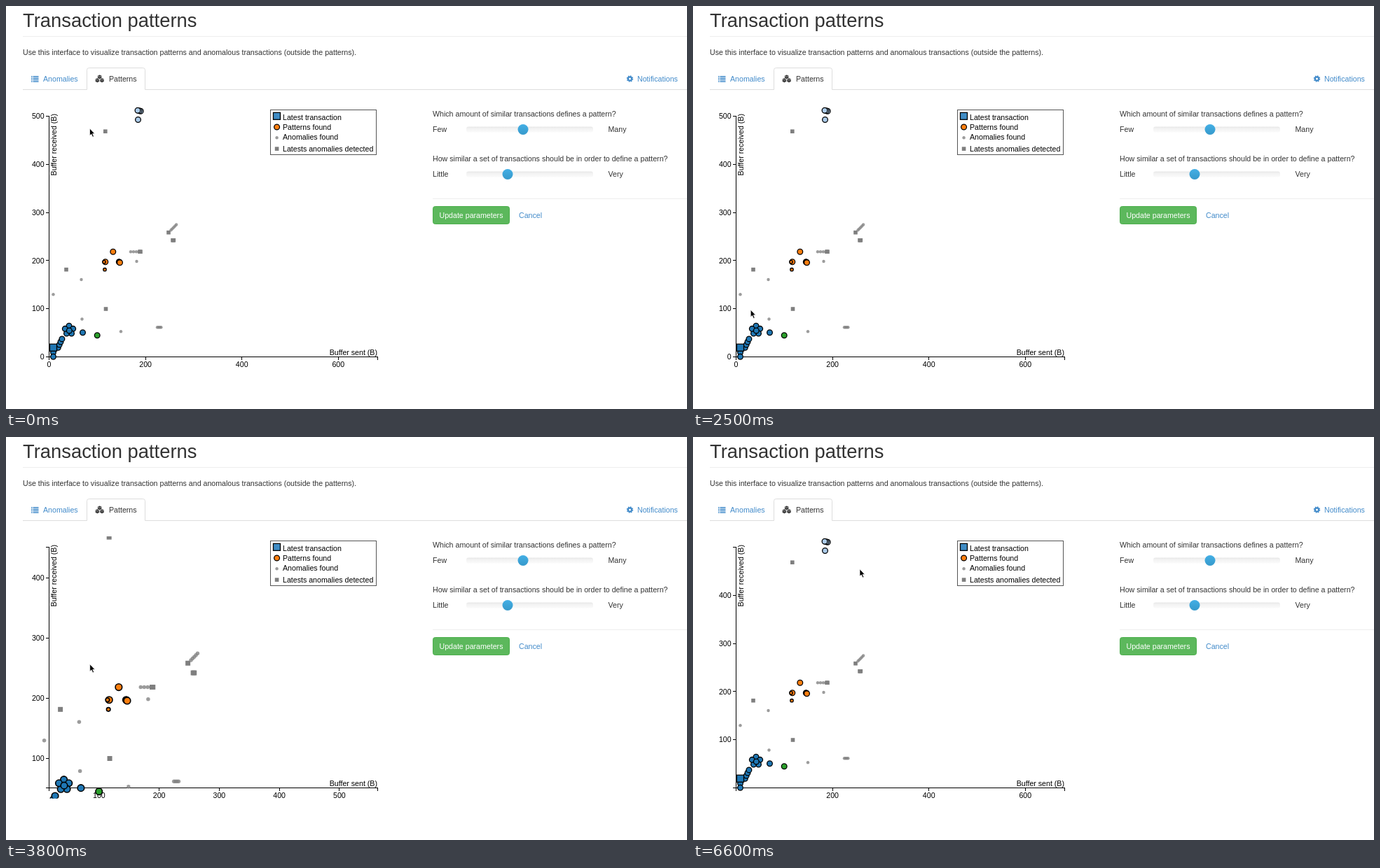
Write an HTML page that moves like this. It is 972 by 576 pixels and loops after 6.7 s.

```html
<!DOCTYPE html>
<html lang="en">
<head>
<meta charset="utf-8">
<title>Transaction patterns</title>
<style>
  html, body { margin: 0; width: 100%; height: 100%; overflow: hidden; background: #fff; }
  svg { position: absolute; left: 0; top: 0; }
  text { font: 10.64px "Liberation Sans", Arial, sans-serif; fill: #333; white-space: pre; }
  .chart text { fill: #000; }
  .title { font-size: 27.36px; }
  .link { fill: #428bca; }
  .mid { text-anchor: middle; }
  .end { text-anchor: end; }
  .line { fill: none; stroke: #000; shape-rendering: crispEdges; }
  .dot { stroke: #000; stroke-width: 1.3; }
  .anomaly { fill: #808080; fill-opacity: .78; }
  .recent { fill: #7f7f7f; }
  #tip {
    position: absolute; left: 67px; top: 469px; box-sizing: border-box; width: 141px;
    padding: 3.5px 5px 4px; background: #1f77b4; color: #fff; border-radius: 1px;
    font: 8.4px/11.25px "Liberation Sans", Arial, sans-serif; white-space: nowrap;
  }
  #tip.open { width: 199px; }
  #tip .more { display: none; }
  #tip.open .more { display: block; }
</style>
</head>
<body>
<svg width="972" height="576" viewBox="0 0 972 576">
  <defs>
    <clipPath id="plot"><rect x="46.5" y="142" width="499" height="374.5"/></clipPath>
    <linearGradient id="track" x2="0" y2="1">
      <stop offset="0" stop-color="#e6e6e6"/><stop offset=".35" stop-color="#f3f3f3"/><stop offset="1" stop-color="#fafafa"/>
    </linearGradient>
    <linearGradient id="knob" x2="0" y2="1">
      <stop offset="0" stop-color="#43afe5"/><stop offset="1" stop-color="#3699cb"/>
    </linearGradient>
    <path id="cube" d="M0-3.3 3-2V1.6L0 3.1-3 1.6V-2Z"/>
  </defs>

  <text class="title" x="24" y="29.5">Transaction patterns</text>
  <path d="M24 43.5H972M609 275.5H972" stroke="#eee"/>
  <text x="24" y="70">Use this interface to visualize transaction patterns and anomalous transactions (outside the patterns).</text>

  <path d="M24 119.5H115.5V91.5q0-3 3-3H195.5q3 0 3 3V119.5H972" fill="none" stroke="#ddd"/>
  <path d="M36 100.8H46.5M36 103.2H46.5M36 105.6H46.5M36 108H46.5" stroke="#428bca" stroke-width="1.5" stroke-dasharray="1.6 .9 8"/>
  <text class="link" x="53" y="108">Anomalies</text>
  <g fill="#333" stroke="#fff" stroke-width=".5">
    <use href="#cube" x="133.7" y="101.5"/><use href="#cube" x="130.4" y="106.3"/><use href="#cube" x="137" y="106.3"/>
    <path d="M127.5 104.8l2.9 1.3 3-1.3M134.1 104.8l2.9 1.3 3-1.3M130.8 100l2.9 1.3 3-1.3" fill="none"/>
  </g>
  <text x="147" y="108">Patterns</text>
  <g fill="none" stroke="#428bca">
    <circle cx="890.5" cy="104" r="2.6" stroke-width="2.2"/>
    <circle cx="890.5" cy="104" r="4" stroke-width="1.5" stroke-dasharray="1.6 1.54"/>
  </g>
  <text class="link" x="901" y="108">Notifications</text>

  <g id="sliders"></g>
  <rect x="609.5" y="286.5" width="109" height="25" rx="3" fill="#5cb85c" stroke="#4cae4c"/>
  <text class="mid" x="664" y="303" style="fill:#fff">Update parameters</text>
  <text class="link" x="732" y="303">Cancel</text>

  <g class="chart">
    <path class="line" d="M57 157.5H61.5V501.5H57M61.5 506V501.5H530.5V506"/>
    <g id="ticks"></g>
    <text class="end" x="530" y="498.5">Buffer sent (B)</text>
    <text class="end" transform="translate(72.3 154) rotate(-90)">Buffer received (B)</text>
    <g clip-path="url(#plot)">
      <g id="nodes">
        <g id="anomalies"></g>
        <g id="recent"></g>
        <g id="patterns"></g>
        <rect class="dot" x="62.5" y="483.2" width="10" height="10" fill="#1f77b4"/>
      </g>
    </g>
    <rect x="377.5" y="148.5" width="151" height="64" fill="#fff" stroke="#555"/>
    <rect class="dot" x="381.5" y="152.3" width="10" height="10" fill="#3f8cc5"/>
    <circle class="dot" cx="386.6" cy="173" r="3.9" fill="#ff7f0e"/>
    <circle class="anomaly" cx="386.6" cy="188.2" r="2.2"/>
    <rect class="recent" x="383.8" y="201.3" width="5.6" height="5.6"/>
    <text x="395" y="162.5">Latest transaction</text>
    <text x="395" y="177">Patterns found</text>
    <text x="395" y="191.2">Anomalies found</text>
    <text x="395" y="207.6">Latests anomalies detected</text>
  </g>
</svg>

<div id="tip">
  <b>URL:</b> http://http-echo.cloudwalk.io<br>
  <b>Sent</b> 9 bytes<br>
  <b>Received</b> 19 bytes<br>
  <b>Pattern seen</b> 413966 times<br>
  <b>Last seen at</b> 2014-10-13 11:30:47
  <div class="more"><b>First seen at</b> 2014-09-12 08:14:05<br>
  <b>Average time</b> between transactions 6 seconds</div>
</div>

<svg width="972" height="576" viewBox="0 0 972 576">
  <g id="cursor">
    <path id="arrow" d="M0 0V10.2L2.3 8.2 4.2 12.2 5.9 11.4 4.1 7.6H7.2Z" stroke="#fff" stroke-width=".7"/>
    <path id="hand" d="M.6.9Q1.6 0 2.6 1L5.2 3.8 7.2 3.6 9 4.8 10.2 7 10.4 9.2 7.8 11.6 5.2 10.6 2.2 9.2 2 8.2 4 8.2 3.4 5.6.8 2.4Q.1 1.6.6.9ZM5.2 3.8 6.3 5.2M7.2 3.6 8 4.9" fill="#fff" stroke="#444" stroke-width=".9"/>
  </g>
</svg>

<script>
const LOOP = 6700, STEP = 100, UNIT = 0.688;
const LEFT = 61.5, RIGHT = 530.5, TOP = 157.5, BOTTOM = 501.5;
const BLUE = '#1f77b4', PALE = '#abcbea', ORANGE = '#ff7f0e', GREEN = '#2ca02c';

const $ = id => document.getElementById(id);
const show = (el, on) => { el.style.display = on ? '' : 'none'; };
const within = (step, from, to) => step >= from && step < to;

const slider = (y, question, low, high, knob) => `
  <text x="609" y="${y - 19}">${question}</text>
  <text x="609" y="${y + 3.5}">${low}</text><text x="859.5" y="${y + 3.5}">${high}</text>
  <rect x="657" y="${y - 4}" width="181" height="8" rx="3" fill="url(#track)"/>
  <circle cx="${knob}" cy="${y}" r="7.5" fill="url(#knob)"/>`;

$('sliders').innerHTML =
  slider(176.5, 'Which amount of similar transactions defines a pattern?', 'Few', 'Many', 738) +
  slider(240.5, 'How similar a set of transactions should be in order to define a pattern?', 'Little', 'Very', 716);

const run = (n, x, y, dx, dy) => Array.from({ length: n }, (_, i) => [x + i * dx, y + i * dy]);
const ring = (n, x, y, r) => Array.from({ length: n }, (_, i) => {
  const a = 2 * Math.PI * i / n;
  return [x + r * Math.sin(a), y - r * Math.cos(a)];
});
const bubbles = (points, fill, r = 3.85) => points.map(([x, y]) =>
  `<circle class="dot" cx="${x}" cy="${y}" r="${r}" fill="${fill}"/>`).join('');
const specks = points => points.map(([x, y]) =>
  `<circle class="anomaly" cx="${x}" cy="${y}" r="2.2"/>`).join('');
const squares = points => points.map(([x, y]) =>
  `<rect class="recent" x="${x - 2.8}" y="${y - 2.8}" width="5.6" height="5.6"/>`).join('');

$('anomalies').innerHTML = specks([
  ...run(5, 235.5, 320.3, 1.9, -1.95), ...run(4, 178, 351.2, 4, 0), ...run(4, 216, 459.3, 1.8, 0),
  [67.5, 412.3], [107.5, 391], [108.5, 447.5], [164, 465.3], [186.5, 365], [390.5, 164.8]
]);
$('recent').innerHTML = squares([
  ...run(2, 238, 334.8, 1.3, 0), ...run(2, 191, 351.2, 1, 0),
  [141.8, 179.2], [86, 376.7], [142.5, 433], [232, 323.7], [152.8, 351.2]
]);
$('patterns').innerHTML =
  bubbles([...run(2, 67.5, 495, 0, 6.2), ...run(4, 74.3, 488.2, 1.87, -4.1),
    ...ring(5, 90, 463.2, 6), [90.3, 464], [109.5, 466.8]], BLUE) +
  bubbles([...run(3, 192.2, 150.3, -2.1, -.5), [188.5, 162.5]], PALE) +
  bubbles([[152.8, 351.2], [141.8, 365.8], ...run(3, 161.3, 365.8, .6, .5)], ORANGE) +
  bubbles([[140, 365.8], [141, 376.7]], ORANGE, 2.2) +
  bubbles([[130.2, 470.8]], GREEN);

// where the pointer rests, in steps; it moves evenly between rests
const RESTS = [
  { from: 0, to: 0, x: 119.5, y: 175 },
  { from: 1, to: 7, x: 139, y: 170 },
  { from: 11, to: 24, x: 63.5, y: 489 },
  { from: 27, to: 43, x: 119.7, y: 324.7 },
  { from: 47, to: 56, x: 388.5, y: 175.3 },
  { from: 58, to: 64, x: 388.5, y: 188.3 },
  { from: 66, to: 67, x: 238, y: 188.8 }
];

function pointer(step) {
  const i = RESTS.findIndex(r => step <= r.to), b = RESTS[i];
  if (step >= b.from) return [b.x, b.y];
  const a = RESTS[i - 1], p = (step - a.to) / (b.from - a.to);
  return [a.x + (b.x - a.x) * p, a.y + (b.y - a.y) * p];
}

const hump = (step, centre, height) => Math.max(0, height - Math.abs(step - centre));

function tickStep(span) {
  const base = 10 ** Math.floor(Math.log10(span / 5));
  const err = base * 5 / span;
  return base * (err <= .15 ? 10 : err <= .35 ? 5 : err <= .75 ? 2 : 1);
}

function axis(origin, unit, lo, hi, slack, mark) {
  const gap = tickStep((hi - lo) / Math.abs(unit));
  let out = '';
  for (let v = -4 * gap; v <= 1500; v += gap) {
    const p = origin + v * unit;
    if (p >= lo - slack && p <= hi + slack) out += mark(p, v);
  }
  return out;
}

const markX = (p, v) =>
  `<path class="line" d="M${p} 501.5V506"/><text class="mid" x="${p}" y="515.8">${v}</text>`;
const markY = (p, v) =>
  `<path class="line" d="M57 ${p}H61.5"/><text class="end" x="54.7" y="${p + 3.6}">${v}</text>`;

function render(step) {
  const level = hump(step, 39, 4) - hump(step, 31, 4) - hump(step, 3, 3);
  const k = 2 ** (.106 * level);
  const [cx, cy] = step < 10 ? [139, 170] : [120, 325.5];
  const dx = cx * (1 - k), dy = cy * (1 - k);
  $('nodes').setAttribute('transform', `translate(${dx} ${dy}) scale(${k})`);

  // rounding after the long zoom drops the ticks at the axis ends
  const slack = step >= 35 && level === 0 ? -.05 : .05;
  $('ticks').innerHTML =
    axis(LEFT * k + dx, UNIT * k, LEFT, RIGHT, slack, markX) +
    axis(BOTTOM * k + dy, -UNIT * k, TOP, BOTTOM, slack, markY);

  show($('patterns'), !within(step, 48, 54));
  show($('anomalies'), !within(step, 58, 64));
  show($('tip'), within(step, 11, 25));
  $('tip').className = step >= 18 ? 'open' : '';

  const onLegend = within(step, 47, 65);
  $('cursor').setAttribute('transform', `translate(${pointer(step)})`);
  show($('arrow'), !onLegend);
  show($('hand'), onLegend);
}

const start = performance.now();
let last = 0;
function tick() {
  const step = Math.floor((performance.now() - start) % LOOP / STEP);
  if (step !== last) render(last = step);
  requestAnimationFrame(tick);
}
render(0);
requestAnimationFrame(tick);
</script>
</body>
</html>
```
